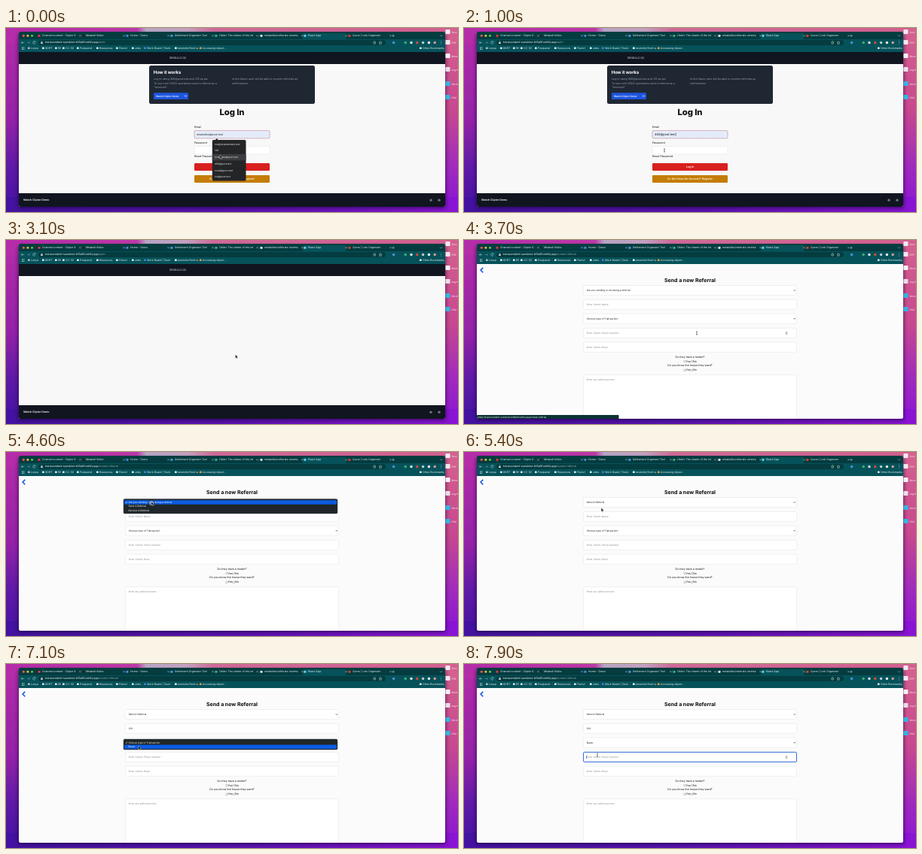
An HTML page for the animation above (8 s loop, 600 by 245 pixels).

```html
<!DOCTYPE html>
<html lang="en">
<head>
<meta charset="utf-8">
<title>Referral demo</title>
<style>
  html, body { margin: 0; width: 100%; height: 100%; overflow: hidden; background: #7a2fb5; }
  svg { display: block; width: 600px; height: 245px; }
  text { font: 3.6px Inter, "Liberation Sans", sans-serif; dominant-baseline: central; text-rendering: geometricPrecision; white-space: pre; }
  .tab { font-size: 3.5px; }
  .sm { font-size: 3.2px; }
  .mail { font-size: 4px; }
  .b { font-weight: 600; }
  .mid { text-anchor: middle; }
  .field { fill: #fff; stroke: #d9dbe0; stroke-width: .4; }
  .focus { fill: none; stroke: #1f63d6; stroke-width: .9; }
  .dash { fill: none; stroke: #c0605c; stroke-width: .6; stroke-dasharray: 1.4 .7; }
  .line { fill: none; stroke: #cfe0de; stroke-width: .5; }
</style>
</head>
<body>
<svg viewBox="0 0 600 245" xmlns="http://www.w3.org/2000/svg">
  <defs>
    <linearGradient id="left" x2="0" y2="1">
      <stop offset="0" stop-color="#b42ca8"/><stop offset=".5" stop-color="#9422a8"/>
      <stop offset=".75" stop-color="#5f1aa6"/><stop offset="1" stop-color="#4312a0"/>
    </linearGradient>
    <linearGradient id="right" x2="0" y2="1">
      <stop offset="0" stop-color="#d4608f"/><stop offset=".45" stop-color="#c8488f"/>
      <stop offset=".75" stop-color="#a02bbd"/><stop offset="1" stop-color="#8a14d4"/>
    </linearGradient>
    <linearGradient id="top">
      <stop offset="0" stop-color="#b42ca8"/><stop offset=".29" stop-color="#bd38a8"/>
      <stop offset=".31" stop-color="#b7a6c6"/><stop offset=".4" stop-color="#c3a0c0"/>
      <stop offset=".46" stop-color="#cf6a98"/><stop offset="1" stop-color="#d4608f"/>
    </linearGradient>
    <linearGradient id="bottom">
      <stop offset="0" stop-color="#4312a0"/><stop offset=".5" stop-color="#5a12b2"/><stop offset="1" stop-color="#8a14d4"/>
    </linearGradient>
    <filter id="blur" x="-5%" y="-10%" width="110%" height="120%"><feGaussianBlur stdDeviation="2.5"/></filter>
    <clipPath id="win"><rect x="17" y="5" width="566" height="233" rx="2.5"/></clipPath>
  </defs>
  <rect width="300" height="245" fill="url(#left)"/>
  <rect x="300" width="300" height="245" fill="url(#right)"/>
  <rect width="600" height="20" fill="url(#top)"/>
  <rect y="225" width="600" height="20" fill="url(#bottom)"/>
  <rect x="16" y="8" width="568" height="232" rx="3" fill="#16052c" opacity=".6" filter="url(#blur)"/>
  <g id="desk"></g>
  <g clip-path="url(#win)">
    <g id="login" data-on="0 3500"></g>
    <g id="form" data-on="3500 8000"></g>
    <g id="chrome"></g>
  </g>
  <g id="popups"></g>
  <g id="cursor">
    <circle id="ring" r="3.8" fill="#fff" fill-opacity=".3" stroke="#222" stroke-width=".8"/>
    <path id="arrow" d="M0-2V3L1.1 2 1.9 3.7 2.7 3.3 2 1.7H3.5Z" fill="#111" stroke="#fff" stroke-width=".35"/>
    <path id="beam" d="M-1-2.2Q0-2.2 0-1.5Q0-2.2 1-2.2M0-1.5V1.5M-1 2.2Q0 2.2 0 1.5Q0 2.2 1 2.2" fill="none" stroke="#222" stroke-width=".55"/>
  </g>
</svg>
<script>
const LOOP = 8000, STEP = 100;
const SIGNED_IN = 2900, FORM = 3500;
const $ = id => document.getElementById(id);
const rect = (x, y, w, h, fill, rx = 0, more = '') =>
  `<rect x="${x}" y="${y}" width="${w}" height="${h}" rx="${rx}" fill="${fill}" ${more}/>`;
const dot = (x, y, r, fill) => `<circle cx="${x}" cy="${y}" r="${r}" fill="${fill}"/>`;
const text = (x, y, s, fill = '#111', cls = '', more = '') =>
  `<text x="${x}" y="${y - .4}" fill="${fill}" class="${cls}" ${more}>${s}</text>`;
const path = (d, cls = 'line', more = '') => `<path d="${d}" class="${cls}" ${more}/>`;
const box = (x, y, w, h, cls) => `<rect x="${x}" y="${y}" width="${w}" height="${h}" rx="1.3" class="${cls}"/>`;
const during = (from, to, s) => `<g data-on="${from} ${to}">${s}</g>`;

function desk() {
  const items = [[5, '#f3eaf2', 'Scre'], [19, '#efe7ee', 'PDF'], [37, '#f4f1f4', 'More'], [55, '#e6dfe9', 'Jog Hi'],
                 [74, '#35b4e2', 'Work'], [92, '#35b4e2', 'DCA']];
  return items.map(([y, fill, s]) =>
    rect(583.5, y - 3, 6, 6, fill, .7) + text(591.5, y + 1, s, '#fff', 'sm')).join('');
}

function chrome() {
  const strip = '#043c40', bar = '#06525a';
  let s = rect(17, 5, 566, 10, strip) + rect(17, 15, 566, 17, bar) + rect(394, 7, 57, 9, bar, 1.5);
  ['#f4605a', '#f6bd3b', '#5bc84c'].forEach((c, i) => s += dot(23.3 + i * 5.6, 10.3, 1.5, c));
  const tabs = [
    [48, '#e33a35', 'Channel content - Cliplor S'], [106, '#222', 'Mirabell Kolbe'], [165, '#3a8fe0', 'Home - Dravo'],
    [224, '#3a9be0', 'Settlement Organizer Tool'], [283, '#36b37e', 'Oblim: The charm of the int'],
    [343, '#e8eeee', 'mirakolbe/referrals-orienta'], [401, '#5fd3ee', 'React App'], [460, '#e23c2c', 'Quvro | Link Organizer']];
  tabs.forEach(([x, c, label], i) => {
    s += dot(x - 4, 10.3, 1.6, c) + text(x, 10.6, label, '#e6f2f1', 'tab') +
      path(`M${x + 49.5} 9.4l1.8 1.8m0-1.8l-1.8 1.8`);
    if (i < 7) s += path(`M${x + 53} 8v4.6`, 'line', 'opacity=".3"');
  });
  s += path('M514 8.6v3.4m-1.7-1.7h3.4') + path('M576 9.5l1.5 1.6 1.5-1.6');

  s += path('M24 19.5h-3.6m1.5-1.5l-1.5 1.5 1.5 1.5') + path('M28 19.5h3.6m-1.5-1.5l1.5 1.5-1.5 1.5', 'line', 'opacity=".5"') +
    path('M38.8 18.6a1.7 1.7 0 1 0 .1 1.5m0-2.6v1.4h-1.4');
  s += rect(43, 16, 461, 7, strip, 3.5) + rect(46.3, 19, 2.4, 2, '#cfe0de', .3) + path('M46.8 19v-.7a.7.7 0 0 1 1.4 0v.7');
  const url = page => text(52, 19.7, `transcendent-sunshine-b16a5f.netlify.app<tspan fill="#8bb0ac">/${page}</tspan>`, '#f1fbfa');
  s += during(0, FORM, url('auth')) + during(FORM, LOOP, url('create-referral'));
  s += path('M488 18v3h2.4v-3m-1.2 1.5v-2.6') + path('M497 17.6l.6 1.3 1.4.2-1 1 .2 1.4-1.2-.7-1.2.7.2-1.4-1-1 1.4-.2z');
  ['#4f8fe0', '', '#3fae6a', '#dbe9e8', '#d9483f', '#b9cfcd', '#eef6f5', '#d79b90']
    .forEach((c, i) => { if (c) s += dot(514.6 + i * 7.8, 19.5, 1.7, c); });
  s += [17.8, 19.5, 21.2].map(y => dot(577.5, y, .4, '#fff')).join('');

  for (let i = 0; i < 9; i++) s += rect(21 + i % 3 * 1.3, 25.4 + Math.floor(i / 3) * 1.3, .8, .8, '#d7e6e5');
  const marks = [[33, '#aebfca', 'Lorpa'], [52, '#d7e6e5', 'KDRT'], [69, '#d7e6e5', 'RE'], [79, '#d7e6e5', 'CC-32'],
    [98, '#d7e6e5', 'Postpanel'], [124, '#d7e6e5', 'Resources'], [150, '#d7e6e5', 'Flurrel'], [171, '#d7e6e5', 'Jobs'],
    [187, '#3d83dc', 'Work Board | Tavlo'], [228, '#eef4f4', 'kestrolm/front-a…'], [261, '#e69a3c', 'Accessing object…'],
    [553, '#d7e6e5', 'Other Bookmarks']];
  marks.forEach(([x, c, label]) => s += rect(x - 4, 25.4, 2.7, 2.7, c, .6) + text(x, 27.2, label, '#e6f2f1', 'tab'));
  return s;
}

function card() {
  const quiet = '#9aa1ad';
  let s = rect(190, 50, 220, 51, '#1f2733', 2.5) +
    text(195.8, 59.5, 'How it works', '#fff', '', 'style="font-size:6px;font-weight:700;letter-spacing:-.13px"');
  ['Log in using 456@post.test and 123 as pw.', 'To use note CRUD operations send a referral as a', '"received"']
    .forEach((t, i) => s += text(196, 68.6 + i * 5.4, t, quiet));
  ['In the future user will be able to receive referrals as', 'notifications.']
    .forEach((t, i) => s += text(300, 68.6 + i * 5.4, t, quiet));
  return s + rect(196, 86.2, 46, 8.8, '#1d55de', 1.3) + text(199, 90.9, 'Watch Cliplor Demo', '#fff', 'sm b') +
    path('M236.3 90.6h3.3m-1.3-1.3l1.3 1.3-1.3 1.3', 'line', 'style="stroke:#fff"');
}

function signIn() {
  let s = text(300, 112.2, 'Log In', '#111', 'mid', 'style="font-size:11.3px;font-weight:800;letter-spacing:-.1px"');
  s += text(250, 132.5, 'Email') + rect(250, 136.6, 100, 10.3, '#e4ecfb', 1.2, 'stroke="#d5dced" stroke-width=".4"') +
    during(0, 1300, box(250, 136.6, 100, 10.3, 'dash'));
  s += during(0, 500, text(253, 142, 'mirakolbe@post.test', '#222')) +
    during(500, 1300, text(253, 142, '456@post.test|', '#111', 'mail')) +
    during(1300, LOOP, text(253, 142, '456@post.test', '#111', 'mail'));
  s += text(250, 153.6, 'Password') + box(250, 157.6, 100, 10.3, 'field') + during(1300, 2200, box(250, 157.6, 100, 10.3, 'dash'));
  for (let i = 0; i < 3; i++) s += during(1500 + i * 200, LOOP, dot(254 + i * 2, 163, .6, '#222'));
  return s + text(250, 171, 'Reset Password') +
    rect(250, 180, 100, 10, '#d8201f', 1.3) + text(300, 185.3, 'Log In', '#fff', 'mid b') +
    rect(250, 196, 100, 10, '#c47d06', 1.3) + text(300, 201.4, 'Do Not Have An Account? Register', '#fff3dc', 'mid b');
}

// Nav and footer stay while the signed-in page loads
function login() {
  return rect(17, 31, 566, 208, '#f8f8f8') + rect(17, 31, 566, 17, '#10151f') + text(228, 40.4, 'SENDALO.QX', '#d8dbe0', 'mid') +
    during(0, SIGNED_IN, card() + signIn()) +
    rect(17, 220, 566, 19, '#10151f') + text(23, 229.4, 'Watch Cliplor Demo', '#fff', 'b') +
    dot(564, 229.2, 1.7, '#6b717c') + dot(575, 229.2, 1.7, '#6b717c');
}

function form() {
  const rows = [60.5, 79.4, 98.2, 117.4, 136.3], H = 13, faint = '#858b95';
  let s = rect(17, 31, 566, 208, '#fbfbfb') +
    path('M25.3 36.8l-3.2 3.3 3.2 3.3', 'line', 'style="stroke:#2b62e3;stroke-width:1.7"') +
    text(300, 53.4, 'Send a new Referral', '#0b0b0b', 'mid', 'style="font-size:7px;font-weight:700"');
  rows.forEach(y => s += box(158.5, y, 283, H, 'field'));
  const value = (i, t, fill = '#16181c') => text(162.7, rows[i] + 6.8, t, fill, 'sm');
  s += during(0, 5300, value(0, 'Are you sending or recieving a referral')) + during(5300, LOOP, value(0, 'Send A Referral'));
  s += during(0, 6400, value(1, 'Enter Clients Name', faint)) + during(6400, 6500, value(1, '1')) +
    during(6500, 6600, value(1, '12')) + during(6600, LOOP, value(1, '123'));
  s += during(0, 7200, value(2, 'Choose type of Transaction')) + during(7200, LOOP, value(2, 'Buyer'));
  s += value(3, 'Enter Clients Phone Number', faint) + value(4, 'Enter Clients Email', faint);
  [0, 2].forEach(i => s += path(`M437.8 ${rows[i] + 6}l1 1.1 1-1.1`, 'line', 'style="stroke:#222;stroke-width:.7"'));

  const spinner = rect(426.8, 121.9, 2.6, 4.3, '#e5e5e5', .4) + path('M427.2 123.5l.9-1 .9 1m-1.8 1.1l.9 1 .9-1', 'line', 'style="stroke:#333"');
  const focus = i => box(158.5, rows[i], 283, H, 'focus');
  const caret = i => path(`M162.6 ${rows[i] + 4.4}v4.4`, 'line', 'style="stroke:#111"');
  s += during(FORM, 4000, spinner) + during(7400, LOOP, spinner);
  s += during(6000, 6400, focus(1) + caret(1)) + during(6400, 6900, focus(1)) + during(7500, LOOP, focus(3) + caret(3));

  ['Do they have a lender?', 'Do you know the house they want?'].forEach((q, i) => {
    const y = 155.9 + i * 11.9;
    s += text(300, y, q, '#111', 'mid') + text(294.6, y + 6, 'Yes') + text(304, y + 6, 'No');
    [291.8, 301.3].forEach(x => s += rect(x, y + 4.5, 2.4, 2.4, '#fff', .4, 'stroke="#777" stroke-width=".4"'));
  });
  s += box(158.5, 179.5, 283, 64, 'field') + text(162.7, 186.2, 'Enter any aditional notes', faint, 'sm');
  return s + during(FORM, 4100, rect(17, 233, 188.5, 5.5, '#0a3432', .8) +
    text(18.2, 235.9, 'https://transcendent-sunshine-b16a5f.netlify.app/create-referral', '#f4fbfa', '', 'style="font-size:3px"'));
}

function suggest(x, y, w, first, items, lit = -1) {
  const gap = 8.75;
  let s = `<path d="M${x + 4} ${y + .3}l2-2.2 2 2.2z" fill="#242527"/>` + rect(x, y, w, first - y + gap * 5 + 5.2, '#242527', 1.8);
  items.forEach((t, i) => {
    if (i === lit) s += rect(x, first + i * gap - 4.2, w, 8.4, '#3c3d40');
    s += text(x + 3.3, first + i * gap + .3, t, '#f2f2f2', 'sm');
  });
  return s;
}

function selectMenu(y, options, lit) {
  const gap = 5.6;
  let s = rect(156, y, 284, options.length * gap + 2.8, '#20272a', 1.6, 'stroke="#3b4447" stroke-width=".4"') +
    rect(157, y + 1.8 + lit * gap, 282, 5.5, '#0b5be0', .9) + path(`M158.9 ${y + 4.8}l.8.9 1.3-2.1`, 'line', 'style="stroke:#fff"');
  options.forEach((t, i) => s += text(162.5, y + 4.8 + i * gap, t, '#fff', 'sm'));
  return s;
}

const mails = ['me@mirabelkolbe.test', '123', 'mirakolbe@post.test', '456@post.test', 'nora1@post.test', 'tim@post.test'];
const names = ['Mirabell', '123', 'Mirabell Kolbe', '123123', 'ty', 'sdf'];
const mailMenu = lit => suggest(273.8, 149, 44.7, 154.6, mails, lit);
const sideMenu = lit => selectMenu(62.4, ['Are you sending or recieving a referral', 'Send A Referral', 'Recieve A Referral'], lit);
const typeMenu = lit => selectMenu(100.1, ['Choose type of Transaction', 'Buyer'], lit);

$('desk').innerHTML = desk();
$('chrome').innerHTML = chrome();
$('login').innerHTML = login();
$('form').innerHTML = form();
$('popups').innerHTML =
  during(0, 300, mailMenu(2)) + during(300, 500, mailMenu(3)) +
  during(4500, 5000, sideMenu(0)) + during(5000, 5300, sideMenu(1)) +
  during(6000, 6400, suggest(182.3, 94.8, 32.7, 100.5, names)) +
  during(6900, 7000, typeMenu(0)) + during(7000, 7200, typeMenu(1));

// Pointer stops: time, x, y
const stops = [[0, 284, 171], [400, 283, 181], [900, 266, 163], [2000, 266, 163], [2400, 279, 156], [2700, 300, 185],
  [2900, 300, 185], [3300, 309, 124], [3900, 309, 124], [4400, 193, 68], [4800, 193, 68], [5200, 185, 73], [5800, 174, 86],
  [6600, 174, 86], [6800, 176, 105], [7100, 176, 111], [7500, 177, 121], [LOOP, 177, 121]];
const beams = [[800, 2300], [FORM, 4000], [5600, 6700], [7400, LOOP]];
const clicks = [[400, 600], [1200, 1400], [2800, 3000], [3400, 3600], [4500, 4700], [5200, 5400], [6000, 6200], [6900, 7000], [7500, 7700]];
const within = (t, spans) => spans.some(([a, b]) => t >= a && t < b);
const show = (el, on) => el.style.display = on ? '' : 'none';
const timed = [...document.querySelectorAll('[data-on]')].map(el => [el, [el.dataset.on.split(' ').map(Number)]]);

function draw(t) {
  timed.forEach(([el, spans]) => show(el, within(t, spans)));
  const i = stops.findIndex(s => s[0] > t), [t0, x0, y0] = stops[i - 1], [t1, x1, y1] = stops[i];
  const u = (t - t0) / (t1 - t0), k = u * u * (3 - 2 * u);
  $('cursor').setAttribute('transform', `translate(${x0 + (x1 - x0) * k} ${y0 + (y1 - y0) * k})`);
  const beam = within(t, beams);
  show($('beam'), beam);
  show($('arrow'), !beam);
  show($('ring'), within(t, clicks));
}

const start = performance.now();
function tick() {
  const t = (performance.now() - start) % LOOP;
  draw(Math.floor(t / STEP) * STEP);
  requestAnimationFrame(tick);
}
tick();
</script>
</body>
</html>
```
